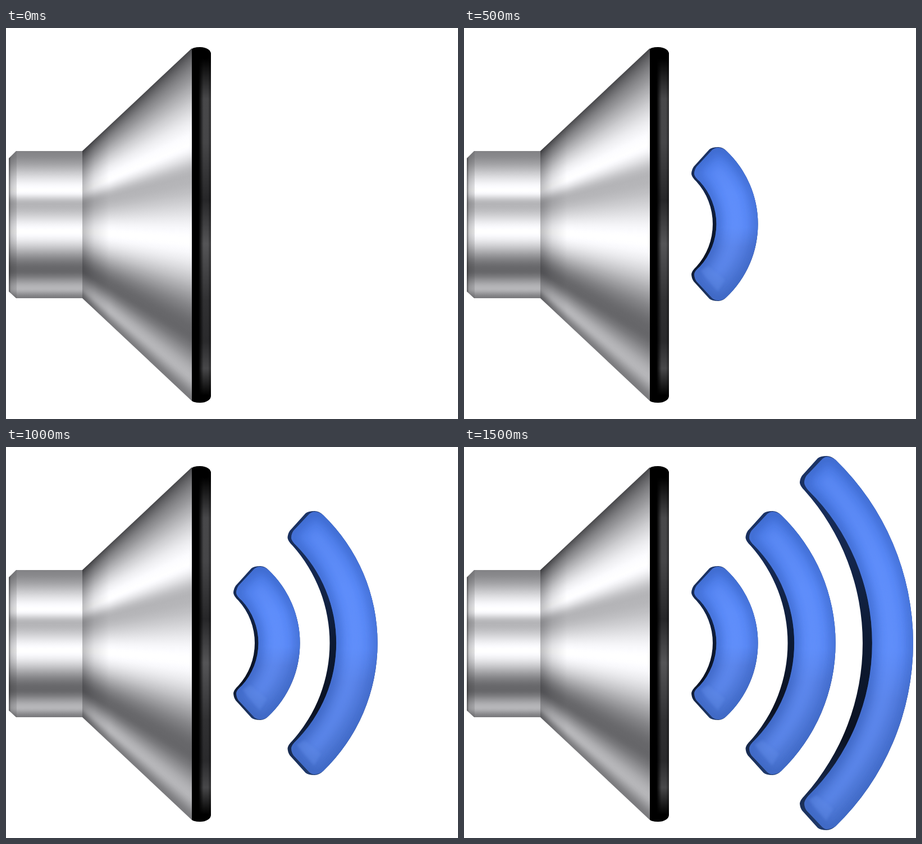
Recreate the animation shown at these times as an HTML page. Size 805 by 696 pixels, loop 2000 ms.

```html
<!DOCTYPE html>
<html lang="en">
<head>
<meta charset="utf-8">
<title>Speaker</title>
<style>
html, body { margin: 0; width: 100%; height: 100%; overflow: hidden; background: #fff; }
div, svg { position: absolute; }
#neck {
  left: 5px; top: 219px; width: 131px; height: 262px;
  clip-path: polygon(0 13px, 13px 0, 100% 0, 100% 100%, 13px 100%, 0 250px);
}
#bevel {
  width: 14px; height: 100%;
  background: linear-gradient(90deg, rgba(30,30,32,.6), rgba(50,50,52,.25) 30%, rgba(70,70,72,.16));
}
#cone {
  left: 136px; top: 36px; width: 195px; height: 628px;
  clip-path: polygon(0 183px, 100% 0, 100% 100%, 0 445px);
}
#throat {
  width: 48px; height: 100%;
  background: linear-gradient(90deg, rgba(20,20,24,.28), rgba(20,20,24,.1) 45%, transparent);
}
#rim {
  left: 331px; top: 34px; width: 34px; height: 633px; overflow: hidden; background: #000;
  border-radius: 14px 19px 19px 14px / 4px 12px 12px 4px;
}
#sheen {
  left: 12px; top: 20px; width: 22px; height: 600px;
  background: linear-gradient(#000, #48484a 12%, #464648 25%, #262628 42%, #555557 55%, #303032 72%, #2a2a2c 84%, #48484a 92%, #000);
  -webkit-mask-image: linear-gradient(90deg, transparent, #000 40%, #000 75%, rgba(0,0,0,.6));
  mask-image: linear-gradient(90deg, transparent, #000 40%, #000 75%, rgba(0,0,0,.6));
}
svg { left: 0; top: 0; }
</style>
</head>
<body>
<div id="neck"><div id="bevel"></div></div>
<div id="cone"><div id="throat"></div></div>
<div id="rim"><div id="sheen"></div></div>
<svg width="805" height="696" viewBox="0 0 805 696">
  <defs>
    <linearGradient id="navy" x1="0" y1="0" x2="0" y2="1">
      <stop offset="0" stop-color="#1c3468"/>
      <stop offset=".5" stop-color="#0d1a33"/>
      <stop offset=".75" stop-color="#0b1222"/>
      <stop offset="1" stop-color="#203a6c"/>
    </linearGradient>
    <linearGradient id="blue" x1="0" y1="0" x2="0" y2="1">
      <stop offset="0" stop-color="#4c7be6"/>
      <stop offset=".3" stop-color="#5989f8"/>
      <stop offset=".52" stop-color="#5b8af7"/>
      <stop offset=".65" stop-color="#547de0"/>
      <stop offset="1" stop-color="#4c76d2"/>
    </linearGradient>
    <filter id="soft" filterUnits="userSpaceOnUse" x="380" y="-20" width="440" height="740">
      <feGaussianBlur stdDeviation="9"/>
    </filter>
    <filter id="crisp" filterUnits="userSpaceOnUse" x="380" y="-20" width="440" height="740">
      <feGaussianBlur stdDeviation="2"/>
    </filter>
  </defs>
  <g id="waves"></g>
</svg>
<script>
const STEP = 500, LOOP = 2000, MID = 349;
const $ = id => document.getElementById(id);

// Metal highlights and shadows: [position from -1 (top) to 1 (bottom), grey level]
const bands = [[-1, 132], [-.46, 255], [-.28, 180], [.09, 255], [.62, 102], [.87, 182], [1, 122]];

function tone(t) {
  const i = Math.max(1, bands.findIndex(b => b[0] >= t));
  const [t0, v0] = bands[i - 1], [t1, v1] = bands[i];
  const u = (t - t0) / (t1 - t0);
  return v0 + (v1 - v0) * u * u * (3 - 2 * u);
}
const topShade = t => 1 - .45 * Math.exp(-(1 + t) / .08);

function stops(level, place) {
  const list = [];
  for (let i = -50; i <= 50; i++) {
    const v = Math.round(level(i / 50));
    list.push(`rgb(${v},${v},${Math.min(255, v + 3)}) ${place(i / 50)}`);
  }
  return list.join(',');
}

$('neck').style.background = `linear-gradient(${stops(tone, t => 50 + 50 * t + '%')})`;
// Bands on the cone fan out from its apex
$('cone').style.background = `conic-gradient(at -140px 314px, ${
  stops(t => tone(t) * topShade(t), t => 90 + Math.atan(t * .935) * 180 / Math.PI + 'deg')})`;

// Left tip, rightmost points of the arcs and their radii all grow evenly from wave to wave
const shape = i => ({
  x: 405 + 96.5 * i, y: 258 - 98 * i,
  out: 523.5 + 138.2 * i, outR: 179 + 137.5 * i,
  face: 449.5 + 138.7 * i, faceR: 112 + 135 * i,
  back: 443 + 133.5 * i, backR: 113 + 147.5 * i,
  inset: 5 + 1.5 * i
});

// x on a circle of radius r with its rightmost point at edge
const arcX = (edge, r, y) => edge - r + Math.sqrt(r * r - (y - MID) ** 2);

function outline(s, edge, r, inset) {
  const x = s.x + inset, y = s.y, top = y - 46 + inset * .2, tx = s.x + 48;
  const oy = y - 39, iy = y + 15;
  const cap = [
    [arcX(edge, r, iy), iy], [x + 1, y + 8], [x, y + 2], [x, y - 5], [x + 4, y - 11],
    [tx - 16 + inset, top + 4], [tx - 11 + inset, top], [tx, top], [tx + 8, top],
    [arcX(s.out, s.outR, oy), oy]
  ];
  const foot = cap.map(([px, py]) => [px, 2 * MID - py]).reverse();
  const trace = ([a, b, c, d, e, f, g, h, i, j]) => `${a}Q${b} ${c}Q${d} ${e}L${f}Q${g} ${h}Q${i} ${j}`;
  const traceBack = ([a, b, c, d, e, f, g, h, i, j]) => `Q${b} ${c}Q${d} ${e}L${f}Q${g} ${h}Q${i} ${j}`;
  return `M${trace(cap)}A${s.outR} ${s.outR} 0 0 1 ${foot[0]}${traceBack(foot)}A${r} ${r} 0 0 0 ${cap[0]}Z`;
}

function ridge(s) {
  const y = s.y - 8, x = s.x + 43, r = (s.outR + s.faceR) / 2;
  return `M${x} ${y}A${r} ${r} 0 0 1 ${x - 4} ${2 * MID - y - 4}`;
}

function wave(s, i) {
  const body = outline(s, s.face, s.faceR, s.inset);
  return `<g>
    <clipPath id="clip${i}"><path d="${body}"/></clipPath>
    <path d="${outline(s, s.back, s.backR, 0)}" fill="url(#navy)"/>
    <path d="${body}" fill="url(#blue)"/>
    <g clip-path="url(#clip${i})" fill="none">
      <path d="${body}" stroke="#2f58b4" stroke-width="16" opacity=".6" filter="url(#soft)"/>
      <path d="${ridge(s)}" stroke="#6996ff" stroke-width="24" opacity=".45" filter="url(#soft)"/>
      <path d="M${s.x + 16} ${2 * MID - s.y - 8}l14 -8 30 24 -13 21z" fill="#5f89e6" opacity=".45" filter="url(#crisp)"/>
    </g>
  </g>`;
}

$('waves').innerHTML = [0, 1, 2].map(i => wave(shape(i), i)).join('');
const waves = [...$('waves').children];

function draw(ms) {
  const shown = Math.floor(ms % LOOP / STEP);
  waves.forEach((w, i) => w.setAttribute('visibility', i < shown ? 'visible' : 'hidden'));
}

const start = performance.now();
function tick() {
  draw(performance.now() - start);
  requestAnimationFrame(tick);
}
tick();
</script>
</body>
</html>
```
